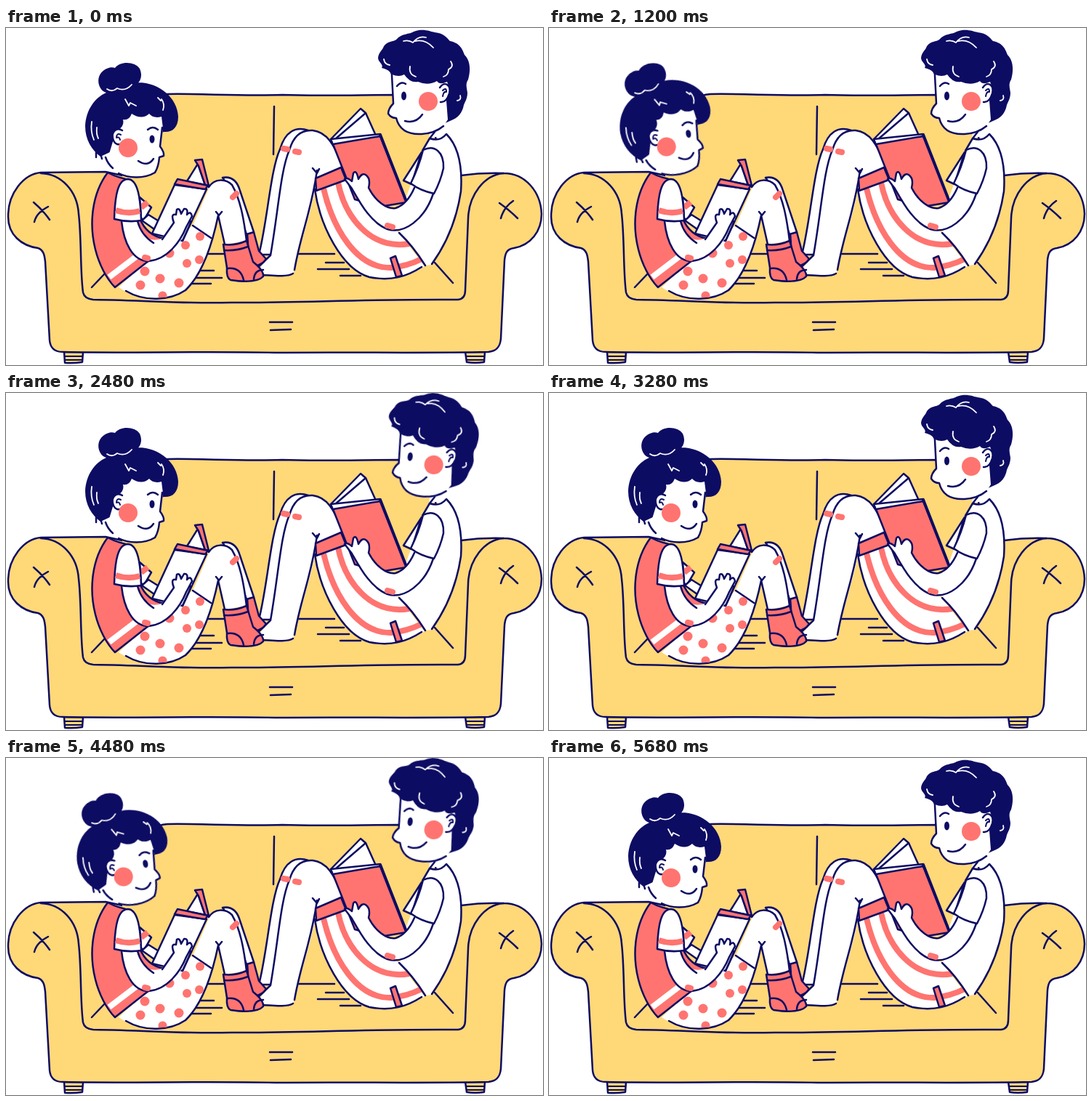
Write an HTML page without scripts that moves like this. It is 739 by 464 pixels and loops after 5760 ms.

```html
<!DOCTYPE html>
<html lang="en">
<head>
<meta charset="utf-8">
<title>Reading on the sofa</title>
<style>
  html, body { margin: 0; width: 100%; height: 100%; overflow: hidden; background: #fff; }
  svg { display: block; width: 739px; height: 464px; }
  svg * { stroke-linecap: round; stroke-linejoin: round; }
  .ink { fill: none; stroke: #0d0c63; stroke-width: 2.5; }
  .white { fill: #fff; }
  .yellow { fill: #ffd878; }
  .red { fill: #ff7470; }
  .navy { fill: #0d0c63; }
  .band { fill: none; stroke: #ff7470; stroke-width: 8; }
  .shine { fill: none; stroke: #fff; stroke-width: 1.8; }
  .butt { stroke-linecap: butt; }

  .head { animation: 5760ms ease-in-out infinite; }
  #girl-head { transform-origin: 157px 198px; animation-name: girl-nod; }
  #boy-head { transform-origin: 603px 167px; animation-name: boy-nod; }
  @keyframes girl-nod {
    0%, 8.33%, 38.9%, 63.9%, 95.8%, 100% { transform: rotate(0deg); }
    19.44%, 27.8%, 75%, 84.7% { transform: rotate(-10.7deg); }
  }
  @keyframes boy-nod {
    0%, 27.8%, 55.5%, 63.9%, 95.8%, 100% { transform: rotate(0deg); }
    38.9%, 44.4%, 75%, 84.7% { transform: rotate(6.5deg); }
  }
</style>
</head>
<body>
<svg viewBox="0 0 739 464">
  <g id="sofa" class="ink">
    <path class="yellow" d="M80 446H106L105 460Q93 462 81 461ZM632 446H659L658 460Q645 462 634 460Z"/>
    <path d="M81 452H105M81 457H105M633 452H658M634 457H658" stroke-width="2"/>
    <path class="yellow" d="M160 205C172 150 180 93 222 91C270 90 320 94 380 92C430 94 490 92 540 92C585 95 592 150 602 205Z"/>
    <path class="yellow" d="M48 199C24 201 3 228 3 258C2 285 22 300 44 303C52 306 53 313 54 322L60 430C61 441 68 446 78 446C180 448 260 445 370 447C480 446 570 448 664 446C676 445 680 438 681 428L686 320C687 309 690 304 699 303C722 299 737 280 737 256C736 226 715 200 685 200Q655 199 626 203L600 203H160L137 198Z"/>
    <path class="yellow" stroke="none" d="M160 195H602V215H160Z"/>
    <path d="M48 200C76 201 98 224 100 256C104 290 102 335 106 364Q108 373 120 374C200 375 240 380 310 378C400 379 490 373 622 374Q632 373 632 361L636 262C637 230 658 202 685 200"/>
    <path d="M276 311L452 311M369 108L368 174M118 357L138 336M590 323L615 351M363 405L394 405M364 416L392 415"/>
    <path d="M260 334H286M258 344L297 344M250 352H282M440 323H465M429 332H472M460 341H488"/>
    <path d="M38 240Q51 251 60 264M58 246Q42 254 39 267M679 241Q692 250 704 262M698 238Q685 247 681 262"/>
  </g>

  <g id="boy-body" class="ink">
    <path class="white" stroke="none" d="M585 130L582 152L606 147L603 125Z"/>
    <path d="M590 143L583 152"/>
    <path class="white" d="M348 312C360 265 364 195 377 167C384 143 398 135 416 141L408 250L365 312Z"/>
    <path class="white" stroke="none" d="M365 310C375 250 378 195 390 168C396 147 408 140 422 141C441 143 452 160 464 192L428 206C422 250 406 290 397 333Q394 342 382 342L345 337Z"/>
    <path d="M343 333L364 313C375 250 378 195 390 168C396 147 408 140 422 141C441 143 452 160 464 192M428 196C421 250 405 285 397 333M395 338C385 344 362 340 350 340M422 193L428 200L431 194"/>
    <path class="band" d="M382 166L387 167M398 170L403 171"/>
    <path class="white" stroke="none" d="M425 222C432 272 462 332 500 343C530 349 555 342 576 328L541 282L510 262L467 208Z"/>
    <path class="band butt" d="M437 221C450 276 482 331 530 330Q552 328 572 318M457 213C466 258 500 306 555 297"/>
    <path d="M425 222C432 272 462 332 500 343C530 349 552 342 572 329"/>
    <path class="red" d="M426 207L461 192L468 209L427 224Z"/>
    <path class="red" d="M529 317L536 314L545 341L537 343Z"/>
    <path class="white" stroke="none" d="M582 151Q597 157 606 146C625 165 628 195 626 225C620 265 602 300 585 326L577 327Q560 300 541 282L548 240L575 167Z"/>
    <path d="M573 169L583 152Q597 157 606 146C625 165 628 195 626 225C620 265 604 300 586 325M541 282Q560 300 577 327"/>
    <path class="white" d="M572 171L547 210L558 215Z"/>
    <path class="white" d="M447 153L488 111L495 117L509 148L453 160Z"/>
    <path d="M453 153L495 117"/>
    <path class="white" d="M447 153L515 146L517 152L450 161Z"/>
    <path class="red" d="M450 160L515 149L551 240L515 246L480 236Z"/>
    <path d="M515 147L551 239" stroke-width="4"/>
    <path class="white" stroke="none" d="M588 227C576 264 548 284 525 277C502 268 488 242 476 221L466 208Q469 205 476 211L478 199Q482 196 485 208Q491 198 497 203Q502 208 499 220C508 238 524 251 538 249Q552 243 562 220Z"/>
    <path d="M588 228C576 264 548 284 525 277C502 268 488 242 476 221L466 208Q469 205 476 211L478 200Q482 194 485 208Q490 198 496 203Q502 208 499 220C508 238 524 250 536 248Q552 243 562 220"/>
    <path class="white" d="M574 168C590 160 603 171 602 193Q598 211 589 228Q570 224 557 214Q568 192 574 168Z"/>
    <path class="band" d="M525 272L532 274"/>
  </g>

  <g id="girl-body" class="ink">
    <path class="red" d="M332 283L341 281L348 307L358 318Q353 326 342 328L334 312Z"/>
    <path class="white" d="M298 206Q316 203 322 224L341 281L331 284L308 220Z"/>
    <path class="white" stroke="none" d="M155 357C185 378 225 377 247 361C268 341 283 302 292 258L301 298L331 293C326 260 321 232 310 215C303 208 288 208 280 219L257 272L195 320Z"/>
    <path d="M165 362C190 377 225 376 247 361C268 341 283 302 292 258L301 298M331 293C327 260 322 235 311 216C302 207 287 207 279 219M257 272L282 289M289 253L293 258L297 253"/>
    <path class="band" d="M312 233L317 228" stroke-width="7"/>
    <path class="red" d="M299 298Q315 300 331 293L340 322Q355 334 354 342C346 351 322 349 309 347Q303 344 304 330Z"/>
    <path d="M300 306Q318 307 333 301M305 331Q323 329 327 347M354 333Q342 333 341 346"/>
    <g class="red" stroke="none">
      <circle cx="267" cy="287" r="6"/><circle cx="247" cy="299" r="6"/>
      <circle cx="225" cy="310" r="6.5"/><circle cx="266" cy="319" r="6"/>
      <circle cx="249" cy="324" r="6"/><circle cx="212" cy="345" r="6.5"/>
      <circle cx="238" cy="351" r="6.5"/><circle cx="191" cy="335" r="6.5"/>
      <circle cx="185" cy="354" r="6.5"/><path d="M210 371A6 6 0 1 1 221 371Z"/>
    </g>
    <path class="red" d="M140 199C118 228 114 270 123 305C128 325 138 345 150 357L197 320L218 290C200 287 190 277 184 262L172 209Q155 207 140 199Z"/>
    <path d="M142 343L184 311" class="butt" style="stroke:#fff;stroke-width:8"/>
    <path class="white" d="M184 233L200 247L190 264L186 262Z"/>
    <path class="band butt" d="M186 247L195 240" stroke-width="7"/>
    <path class="white" d="M196 257L212 267L204 277L187 265Z"/>
    <path class="white" d="M232 216L276 222L243 293L201 283Z"/>
    <path class="white" d="M249 211L264 187L274 216Z"/>
    <path class="red" d="M260 182L270 181L279 217L274 216L265 190Z"/>
    <path class="red" d="M236 208L278 217L274 222L232 215Z"/>
    <path class="white" stroke="none" d="M158 264C162 295 174 321 196 321C225 318 246 290 255 266L257 257Q254 252 249 257Q248 246 242 250L241 256Q235 246 232 256Q227 257 231 268L214 290C196 296 185 285 181 264Z"/>
    <path d="M159 266C162 295 174 321 196 321C222 319 240 294 248 274L256 259Q254 251 249 257Q251 248 245 249L241 256Q239 247 235 250L234 257Q226 255 231 268L215 291M181 266Q186 285 203 296M243 293L255 266"/>
    <path class="white" d="M149 263C150 230 154 208 168 208C182 209 185 236 186 265Q168 268 149 263Z"/>
    <path class="band butt" d="M151 251Q168 257 184 252"/>
    <path class="band" d="M191 316L195 317" stroke-width="7"/>
  </g>

  <g id="girl-head" class="head ink">
    <path class="white" stroke="none" d="M135 174L145 191L158 202L190 190L170 150Z"/>
    <path class="navy" stroke="none" d="M130 177C118 168 109 154 109 135C110 113 122 96 138 89C128 86 124 72 130 63C136 55 145 53 150 55C157 45 178 46 184 56C189 67 184 77 176 79L180 75C210 74 236 96 237 122C237 137 229 144 217 143L200 150L143 171Z"/>
    <path class="white" stroke="none" d="M152 140C158 140 163 133 161 126Q169 128 173 118Q187 127 197 118Q203 125 214 122L216 138L213 165Q220 172 217 177L211 179L206 199C190 209 165 206 153 199L142 173Z"/>
    <path d="M215 137L212 163Q218 171 217 176L211 178Q210 191 205 199C190 208 168 207 155 200M137 178Q140 187 147 193M124 171L124 178M130 173L132 180"/>
    <path class="white" d="M160 141C150 135 144 146 148 155Q152 163 160 159"/>
    <path d="M158 147Q152 144 152 151Q156 149 157 154" stroke-width="2"/>
    <circle class="red" stroke="none" cx="168" cy="165" r="13"/>
    <ellipse class="navy" stroke="none" cx="201" cy="153" rx="3.5" ry="5.5"/>
    <path d="M195 140Q202 134 209 140M182 183Q195 192 203 180"/>
    <path class="shine" d="M139 84Q146 89 153 83Q164 88 173 78M164 98L169 107L171 103L179 107M214 98Q219 105 216 113M209 96L213 100M118 129Q116 143 121 154M125 137Q124 146 127 152"/>
  </g>

  <g id="boy-head" class="head ink">
    <path class="navy" stroke="none" d="M530 68C531 61 526 57 517 55C520 50 512 47 512 41C513 33 518 31 520 25C525 18 533 19 537 16C545 7 555 9 561 5C574 0 584 5 590 6C603 7 607 14 611 18C625 21 628 29 631 37C640 46 639 60 636 71C632 77 634 82 635 89C635 97 632 101 630 106C628 117 622 124 611 128L602 132L590 95Z"/>
    <path class="white" stroke="none" d="M531 64Q541 68 548 64Q556 76 567 74Q581 80 593 73Q597 79 607 74L611 85L606 100L608 126C600 141 582 150 562 146Q542 141 538 124Q526 122 526 116Q529 108 533 106Z"/>
    <path d="M531 65L533 104Q526 111 526 118Q530 124 537 124C541 140 553 147 572 146Q590 145 602 135"/>
    <path class="white" d="M597 82C604 72 613 79 610 90Q606 103 598 102"/>
    <path d="M601 86Q606 81 606 88Q602 87 601 94" stroke-width="2"/>
    <circle class="red" stroke="none" cx="581" cy="101" r="13"/>
    <ellipse class="navy" stroke="none" cx="547.5" cy="93.5" rx="3.5" ry="6"/>
    <path d="M538 80Q544 73 550 77M549 128Q564 132 573 119"/>
    <path class="shine" d="M547 18Q554 16 560 20Q568 10 578 13M563 18Q577 15 588 27M520 43Q521 50 528 51M556 53Q554 64 564 67M612 46Q617 53 609 57Q609 65 602 67M625 93Q627 99 621 100"/>
  </g>
</svg>
</body>
</html>
```
